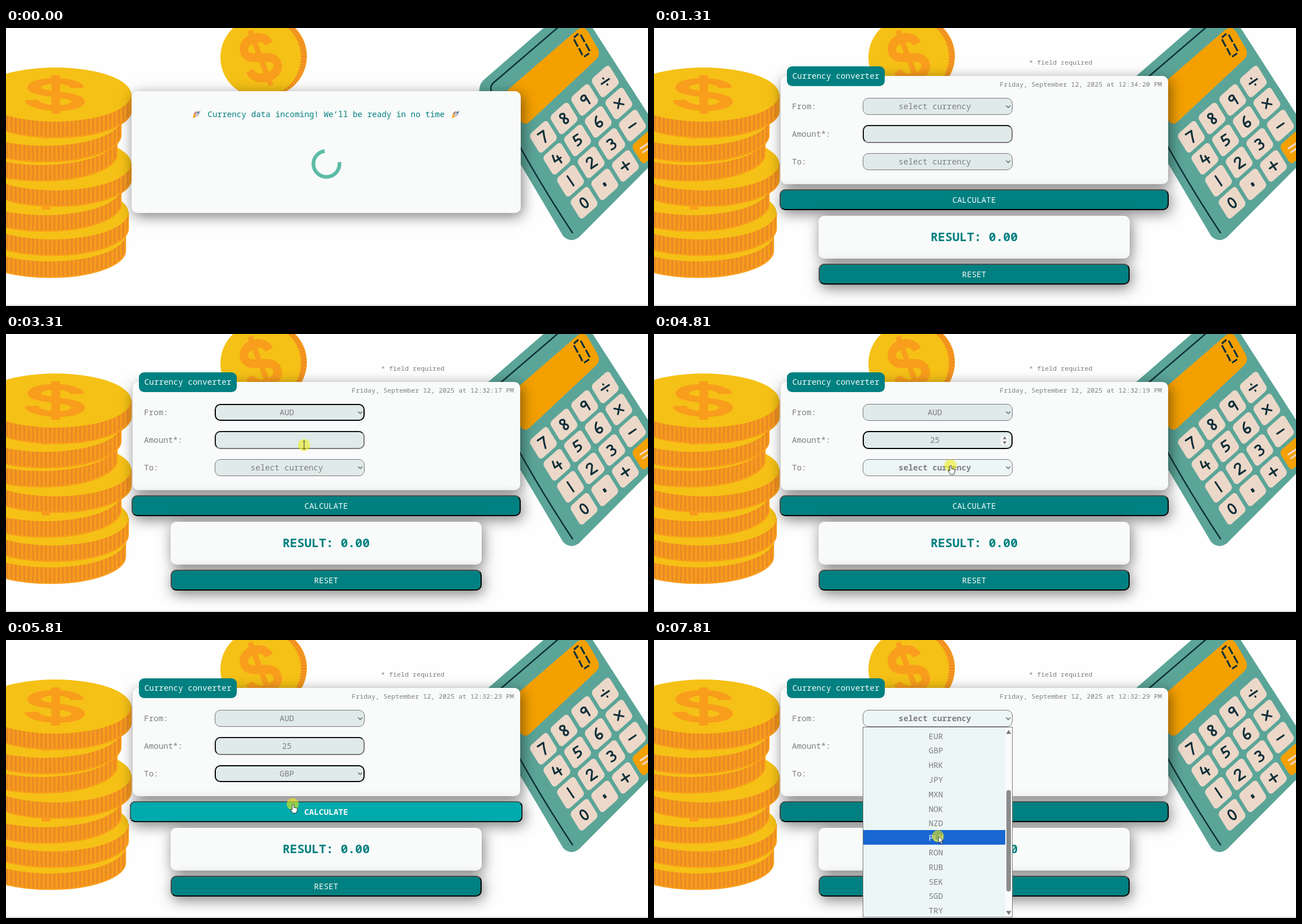
These frames come from a looping animation (1135x493 px, 8 s). An HTML page:

```html
<!DOCTYPE html>
<html lang="en">
<head>
<meta charset="utf-8">
<title>Currency converter</title>
<style>
html, body { margin: 0; width: 100%; height: 100%; overflow: hidden; background: #fefefe; }
svg { left: 0; top: 0; }
#stage { position: absolute; left: 0; top: 0; width: 1135px; height: 493px; overflow: hidden;
  font: 14.25px "Noto Sans Mono", "Liberation Mono", monospace; color: #7d7f80; white-space: nowrap; }
#stage div, #stage svg { position: absolute; box-sizing: border-box; }
#form, #loader { inset: 0; }
.card { background: #f9fafa; border-radius: 10px; box-shadow: 3px 6px 24px rgba(0,0,0,.5); }
.mid { text-align: center; }
.small { font-size: 11.67px; line-height: 18px; }
.label { left: 244px; line-height: 20px; }
.btn { height: 37px; line-height: 33px; border: 2px solid; border-color: #4c4c4c #000 #000 #4c4c4c;
  border-radius: 10px; background: #008080; color: #f4fafa; text-align: center;
  box-shadow: 3px 6px 24px rgba(0,0,0,.5); }
.btn.hover { background: #00aaad; font-weight: bold; transform: scale(1.01); }
.field { left: 369px; width: 265px; height: 30px; line-height: 28px; padding-right: 10px;
  border: 1px solid #767676; border-radius: 10px; background: #e0eaea; text-align: center; }
.field.hover { background: #edf6f7; font-weight: bold; }
#amount { height: 32px; border: 2px solid; border-color: #111 #777 #777 #111; }
#stage .field.focus { border: 2px solid #000; line-height: 26px; }
#stage #amount { line-height: 28px; }
#spin { left: 613px; top: 180px; }
#list { left: 369px; width: 265px; height: 337.5px; border: 1px solid #777; background: #fafbfb; overflow: hidden; }
#rows { left: 0; top: 0; width: 250.5px; background: #edf6f7; }
#rows div { left: 0; width: 100%; height: 25.8px; line-height: 27px; padding-left: 6px; text-align: center; }
#rows .pick { background: #1967d2; color: #eef4ff; }
#thumb { left: 253px; width: 8px; height: 180px; border-radius: 4px; background: #8b8b8b; }
#cursor { overflow: visible; }
</style>
</head>
<body>
<div id="stage">
  <svg id="scene" width="1135" height="493">
    <defs>
      <pattern id="ridge" width="7.6" height="10" patternUnits="userSpaceOnUse">
        <rect width="8" height="10" fill="#f99d1c"/><rect width="4" height="10" fill="#e98b24"/>
      </pattern>
      <g id="dollar" fill="none" stroke="#f99d1c">
        <path d="M0-46V46" stroke-width="9"/>
        <path d="M22-16C20-38-22-38-22-17C-22 3 23-4 23 17C23 38-22 38-25 13" stroke-width="14"/>
      </g>
    </defs>
    <g id="coins"></g>
    <use href="#dollar" transform="translate(88 118) scale(1.72 .74)"/>
    <circle cx="461" cy="50" r="71" fill="#f99d1c"/>
    <circle cx="461" cy="50" r="66" fill="none" stroke="#e98b24" stroke-width="8" stroke-dasharray="2.4 2.4"/>
    <circle cx="450" cy="52" r="71" fill="#f5c116"/>
    <use href="#dollar" transform="translate(450 53) rotate(-21) scale(1.05 1.13)"/>
    <path fill="#5ba598" d="M837 114Q835 99 848 89L956-5H1034L1140 160V243L1013 371Q998 382 985 369L839 122Z"/>
    <path fill="none" stroke="#0d2f3a" stroke-width="2.5" d="M977-2L862 97Q854 104 859 115L910 213Q950 285 1002 364"/>
    <path fill="#f4a000" d="M889 108L1010 3Q1022-6 1030 8L1046 36Q1052 48 1042 57L927 165Q917 175 909 164L884 125Q882 115 889 108Z"/>
    <path fill="none" stroke="#0d2f3a" stroke-width="3.2"
      d="M1004 17L1012 10M1016 12L1023 25M1025 28L1032 41M1031 45L1022 51M1019 48L1013 36M1011 33L1004 20"/>
    <g id="keys"></g>
    <path d="M0 491.7H1135" stroke="#cfd2d3" stroke-width="1.6"/>
  </svg>

  <div id="loader">
    <div class="card" style="left:222px;top:112px;width:688px;height:216px"></div>
    <div class="mid" style="left:222px;top:143px;width:688px;line-height:20px;color:#008080">Currency data incoming! We’ll be ready in no time</div>
    <svg width="1135" height="493">
      <g id="rocket">
        <path fill="#f6a623" d="M330 160L332 152 337 157Z"/>
        <path fill="#c0513f" d="M332 152L336 148H339L335 154ZM337 157L341 154V150L336 155Z"/>
        <path fill="#bfc8cf" d="M334 154Q336 147 344 146Q343 154 336 157Z"/>
        <circle cx="340" cy="150" r="1.6" fill="#4a6f8a"/>
      </g>
      <use href="#rocket" x="458"/>
      <circle id="spinner" cx="566.5" cy="241" r="23" fill="none" stroke="#5cbba6" stroke-width="6.5" stroke-dasharray="75 25" pathLength="100"/>
    </svg>
  </div>

  <div id="form">
    <div class="card" style="left:224px;top:85px;width:685px;height:192px"></div>
    <div class="small" style="left:663px;top:52px">* field required</div>
    <div class="small" id="clock" style="right:237px;top:91px"></div>
    <div class="mid" style="left:235px;top:68px;width:173px;height:35px;line-height:34px;border-radius:9px;background:#008080;color:#f4fafa">Currency converter</div>
    <div class="label" style="top:129px">From:</div>
    <div class="label" style="top:178px">Amount*:</div>
    <div class="label" style="top:227px">To:</div>
    <div class="field" id="from" style="top:124px"></div>
    <div class="field" id="amount" style="top:172px"></div>
    <div class="field" id="to" style="top:221.5px"></div>
    <svg width="1135" height="493" fill="none" stroke="#666" stroke-width="1.6">
      <path d="M622.5 137.5l3.7 3.7 3.7-3.7M622.5 235l3.7 3.7 3.7-3.7"/>
    </svg>
    <svg id="spin" width="14" height="17">
      <rect width="14" height="17" rx="4" fill="#f7f7f7"/>
      <path fill="#777" d="M3.5 6.5L7 1.5 10.5 6.5ZM3.5 10.5H10.5L7 15.5Z"/>
    </svg>
    <div class="btn" id="calc" style="left:222px;top:286px;width:688px">CALCULATE</div>
    <div class="card mid" id="result" style="left:291px;top:333px;width:550px;height:76px;line-height:74px;color:#008080;font-size:21.4px;font-weight:bold"></div>
    <div class="btn" id="reset" style="left:291px;top:418px;width:550px">RESET</div>
  </div>

  <div id="list">
    <div id="rows"></div>
    <div id="thumb"></div>
    <svg width="264" height="336" fill="#777"><path d="M252.5 11.5L257 4.5 261.5 11.5ZM252.5 325.5H261.5L257 332.5Z"/></svg>
  </div>

  <svg id="cursor" width="30" height="30">
    <circle r="10.7" fill="#f0ee10" fill-opacity=".58"/>
    <g fill="#fff" stroke="#333" stroke-linejoin="round">
      <path id="arrow" d="M1 0V12L4 9.5 6 14 8 13 6 8.5H9.5Z"/>
      <path id="hand" d="M-1 1Q1-1 2 1V6L7 7Q8.5 8 8 11L6 16H0L-4 10Q-4 8-1 10Z"/>
      <path id="beam" fill="none" d="M-2-7H2M0-7V7M-2 7H2"/>
    </g>
  </svg>
</div>

<script>
const $ = id => document.getElementById(id);
const LOOP = 8000, ROW = 25.8, EMPTY = "select currency";
const CODES = "AUD BGN CAD CHF CZK DKK EUR GBP HRK JPY MXN NOK NZD PLN RON RUB SEK SGD TRY USD ZAR".split(" ");

// Coin stack, bottom coin first
const coin = (x, y) =>
  `<path d="M${x - 134} ${y}v29a134 47 0 0 0 268 0v-29z" fill="url(#ridge)" stroke="#f99d1c" stroke-width="2.5"/>
   <ellipse cx="${x}" cy="${y}" rx="134.5" ry="48" fill="#f5c116"/>`;
const notch = y => `<rect x="63" y="${y}" width="15" height="7" fill="#f99d1c"/>`;
$("coins").innerHTML = coin(77, 366) + coin(82, 327) + coin(69, 284) + notch(315) +
  coin(87, 240) + coin(62, 195) + coin(69, 161) + notch(189) + coin(87, 118);

// Calculator keys: glyph strokes by row
const GLYPHS = [
  "M-6-9H6Q1 0-2 10", "M4-7C-2-13-9-5 0 0C10 5 1 13-3 8C-7 2 7-2 4-7", "M5-6C0-12-8-4-3 0C2 2 5-2 5-6L4 10", "M-8 0H8M0-7v1M0 6v1",
  "M-3-9L-6 2H7M3-4V10", "M6-9H-3L-4-1C8-4 8 9-5 8", "M3-10C-8-2-7 9 0 9C8 8 6-3-4 2", "M-6-6L6 6M6-6L-6 6",
  "M0-10V10", "M-6-5C-3-12 7-9 4-3L-6 9H7", "M-5-8C5-12 7-2-1-1C9 0 5 12-6 8", "M-7 0H7",
  "M0-9C-7-9-6 9 0 9C7 9 6-9 0-9", "M-1-2h2v4h-2z", "M-8 0H8M0-8V8", "M-9-4H9M-9 4H9"];
$("keys").innerHTML = GLYPHS.map((d, i) => {
  const c = i % 4, r = i >> 2, x = 950 + 36.5 * c + 24 * r, y = 193 - 32.7 * c + 39 * r, eq = i == 15;
  return `<rect x="-.43" y="-.43" width=".86" height=".86" rx=".14" fill="${eq ? "#f4a000" : "#ecd8c8"}"
    transform="matrix(36.5 -32.7 24 39 ${x} ${y})"/>
    <path d="${d}" transform="translate(${x} ${y}) rotate(-34)" fill="none" stroke="${eq ? "#ecd8c8" : "#0d2f3a"}"
    stroke-width="3.2" stroke-linecap="round" stroke-linejoin="round"/>`;
}).join("");

$("rows").innerHTML = [EMPTY, ...CODES].map((s, i) => `<div style="top:${i * ROW}px">${s}</div>`).join("");
$("rows").style.height = (CODES.length + 1) * ROW + "px";

// Each step starts at `at`; cur is [shape, x, y]
const STEPS = [
  { at: 920, clock: "34:20" },
  { at: 1810, clock: "32:14" },
  { at: 2310, clock: "32:15", hover: "from", cur: ["hand", 543, 144] },
  { at: 2810, clock: "32:16", hover: "from", open: 154, pick: 1, cur: ["arrow", 527, 197] },
  { at: 3310, clock: "32:17", from: "AUD", focus: "from", cur: ["beam", 527, 197] },
  { at: 3810, clock: "32:18", from: "AUD", focus: "amount", cur: ["beam", 525, 192] },
  { at: 4310, clock: "32:19", from: "AUD", amount: "2", focus: "amount", cur: ["beam", 525, 192] },
  { at: 4810, clock: "32:19", from: "AUD", amount: "25", focus: "amount", hover: "to", cur: ["hand", 524, 233] },
  { at: 5310, clock: "32:21", from: "AUD", amount: "25", hover: "to", open: -115, pick: 8, cur: ["arrow", 520, 107] },
  { at: 5810, clock: "32:23", from: "AUD", amount: "25", to: "GBP", focus: "to", hover: "calc", cur: ["hand", 507, 291] },
  { at: 6310, clock: "32:24", from: "AUD", amount: "25", to: "GBP", total: "12.26", hover: "reset", cur: ["hand", 560, 432] },
  { at: 6810, clock: "32:25", hover: "from", cur: ["hand", 543, 144] },
  { at: 7310, clock: "32:27", hover: "from", open: 154, pick: 7, cur: ["arrow", 510, 348] },
  { at: 7810, clock: "32:29", hover: "from", open: 154, pick: 14, scroll: 179, cur: ["arrow", 502, 348] }
];

const show = (id, on) => $(id).style.display = on ? "" : "none";

function apply(s) {
  $("clock").textContent = `Friday, September 12, 2025 at 12:${s.clock} PM`;
  $("from").textContent = s.from || EMPTY;
  $("to").textContent = s.to || EMPTY;
  $("amount").textContent = s.amount || "";
  $("result").textContent = "RESULT: " + (s.total || "0.00");
  for (const id of ["from", "amount", "to", "calc", "reset"]) {
    $(id).classList.toggle("hover", s.hover == id);
    $(id).classList.toggle("focus", s.focus == id);
  }
  show("spin", s.focus == "amount");
  show("list", s.open !== undefined);
  if (s.open !== undefined) {
    const scroll = s.scroll || 0;
    $("list").style.top = s.open + "px";
    $("rows").style.top = -scroll + "px";
    $("thumb").style.top = 16 + scroll * .533 + "px";
    [...$("rows").children].forEach((row, i) => row.className = i == s.pick ? "pick" : "");
  }
  show("cursor", s.cur);
  if (s.cur) {
    const [shape, x, y] = s.cur;
    for (const id of ["arrow", "hand", "beam"]) show(id, id == shape);
    $("cursor").style.transform = `translate(${x}px, ${y}px)`;
  }
}

let last;
function draw(now) {
  const t = now % LOOP, loading = t < 920;
  const step = STEPS.filter(s => s.at <= t).pop() || STEPS[0];
  if (step != last) apply(last = step);
  show("loader", loading);
  const tick = t < 80 ? 0 : 80 + Math.floor((t - 80) / 69.1) * 69.1;
  $("spinner").setAttribute("transform", `rotate(${-8 + tick * .36} 566.5 241)`);
  $("form").style.opacity = loading ? 0 : Math.min(1, (Math.floor((t - 920) / 65) + 1) / 7);
}
function loop() {
  draw(performance.now());
  requestAnimationFrame(loop);
}
loop();
</script>
</body>
</html>
```
